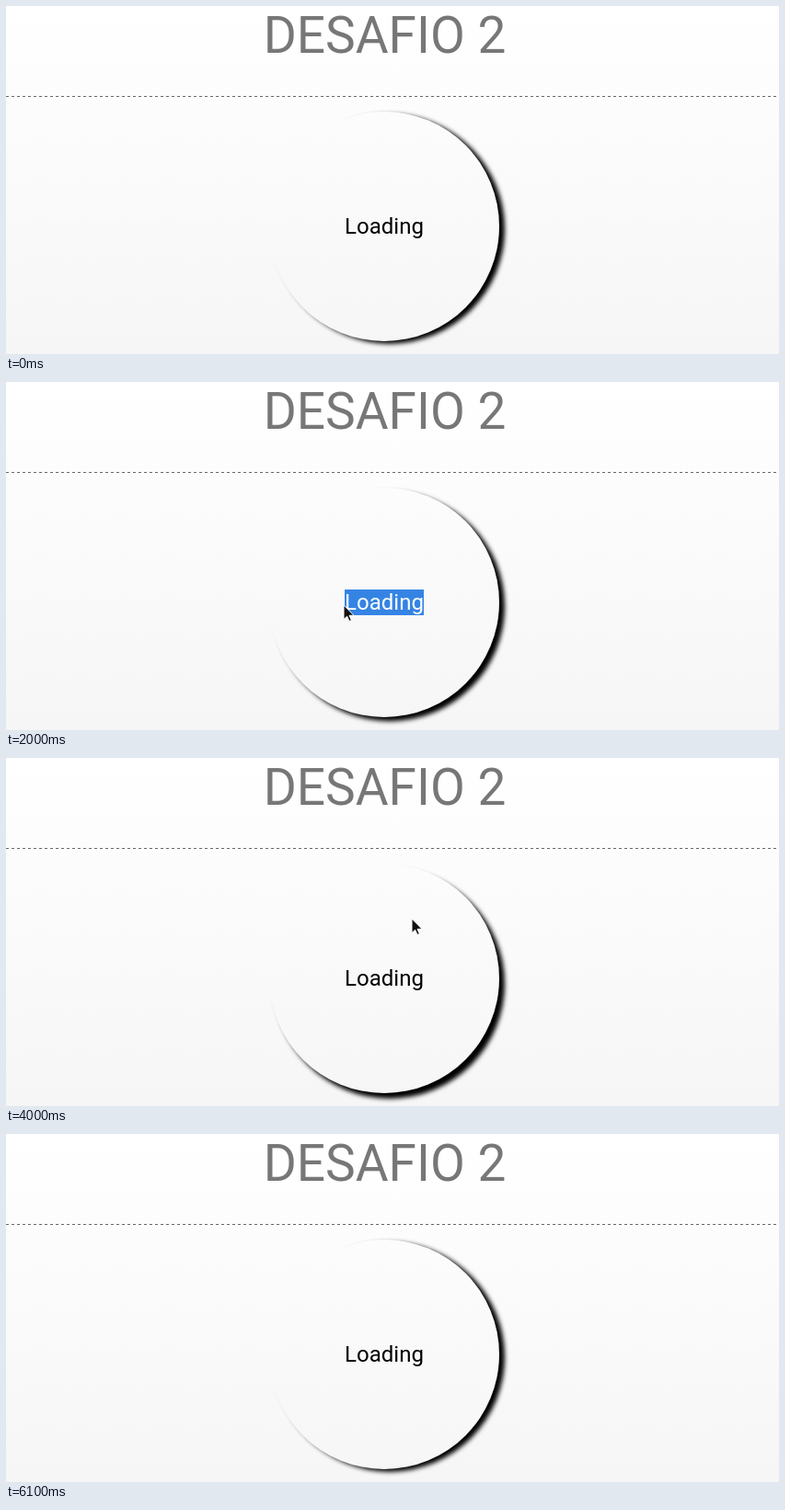
Animation of 840x379 px, one loop 6200 ms. Source, as an HTML page:

```html
<!DOCTYPE html>
<html lang="pt">
<head>
<meta charset="utf-8">
<title>Desafio 2</title>
<style>
  html, body { margin: 0; width: 100%; height: 100%; overflow: hidden; }
  body {
    position: relative;
    font-family: Roboto, sans-serif;
    background: linear-gradient(#fff, #f6f6f6);
  }
  h1 {
    position: absolute; left: 0; top: 0; width: 823px; margin: 0;
    font-size: 55px; font-weight: 400; line-height: 64px;
    text-align: center; color: #777;
  }
  .rule {
    position: absolute; left: 0; right: 0; top: 98px; height: 1px;
    background: repeating-linear-gradient(90deg, #666 0 3px, transparent 3px 6px);
  }
  .loader {
    position: absolute; left: 286px; top: 115px; width: 250px; height: 250px;
    border-radius: 50%; font-size: 24px; line-height: 250px;
    text-align: center; color: #000;
  }
  #selected { color: #fff; background: #3584e4; }
  svg { position: absolute; left: 0; top: 0; overflow: visible; }
</style>
</head>
<body>
<h1>DESAFIO 2</h1>
<div class="rule"></div>
<div class="loader" id="loader"><span id="plain"></span><span id="selected"></span></div>
<svg width="1" height="1">
  <defs><path id="bar" d="M-3.5 -7H-1L0 -6L1 -7H3.5M0 -6V6M-3.5 7H-1L0 6L1 7H3.5"/></defs>
  <path id="arrow" d="M0 0V15.5L3.6 12.2L6 17.5L8.4 16.4L6 11.3H11Z" fill="#111" stroke="#fff"/>
  <g id="beam" fill="none">
    <use href="#bar" stroke="#fff" stroke-width="3"/>
    <use href="#bar" stroke="#111"/>
  </g>
</svg>
<script>
const LOOP = 6200, STEP = 100, SPIN = 6100 / 6;
const WORD = 'Loading', TEXT_LEFT = 368, TEXT_RIGHT = 455;
const OFFSET = 6, START = 0.315; // shadow distance, phase at load
const $ = id => document.getElementById(id);
const mix = (a, b, u) => a + (b - a) * u;

// Shadow keyframes at even quarters of a turn.
const corners = [[0, 1], [1, 1], [1, -1], [-1, -1]];

const stops = [
  { t: 100, x: 133, y: 34 },
  { t: 600, x: 485, y: 196 },
  { t: 1100, x: 455, y: 245 },
  { t: 1700, x: 367, y: 243 },
  { t: 2600, x: 367, y: 243 },
  { t: 4000, x: 441, y: 175 },
  { t: 4800, x: 449, y: 248 },
  { t: 5500, x: 58, y: 0 }
];

function drawShadow(t) {
  const turn = (t / SPIN + START) * 4;
  const i = Math.floor(turn), u = turn - i;
  const from = corners[i % 4], to = corners[(i + 1) % 4];
  const [x, y] = from.map((v, axis) => OFFSET * mix(v, to[axis], u));
  $('loader').style.boxShadow = `${x}px ${y}px 5px #000`;
}

function pointerAt(t) {
  const i = stops.findIndex(stop => stop.t >= t);
  if (i < 0 || t < stops[0].t) return null;
  const b = stops[i], a = stops[i - 1] || b;
  const u = (t - a.t) / (b.t - a.t || 1);
  return { x: mix(a.x, b.x, u), y: mix(a.y, b.y, u) };
}

// Dragging left selects every letter the pointer has passed.
function drawSelection(t, pointer) {
  const active = t >= 1100 && t < 3300;
  const reach = active ? (TEXT_RIGHT - (t < 2600 ? pointer.x : TEXT_LEFT)) / (TEXT_RIGHT - TEXT_LEFT) : 0;
  const split = WORD.length - Math.min(WORD.length, Math.round(reach * WORD.length));
  $('plain').textContent = WORD.slice(0, split);
  $('selected').textContent = WORD.slice(split);
}

function drawPointer(pointer) {
  const { x, y } = pointer || { x: 0, y: 0 };
  const overText = x > TEXT_LEFT && x < TEXT_RIGHT && y > 225 && y < 254;
  const place = (id, shown) => {
    $(id).style.display = pointer && shown ? '' : 'none';
    $(id).setAttribute('transform', `translate(${x} ${y})`);
  };
  place('arrow', !overText);
  place('beam', overText);
}

function render(now) {
  const t = Math.floor((now % LOOP) / STEP) * STEP;
  const pointer = pointerAt(t);
  drawShadow(t);
  drawSelection(t, pointer);
  drawPointer(pointer);
}

function tick() {
  render(performance.now());
  requestAnimationFrame(tick);
}
tick();
</script>
</body>
</html>
```
